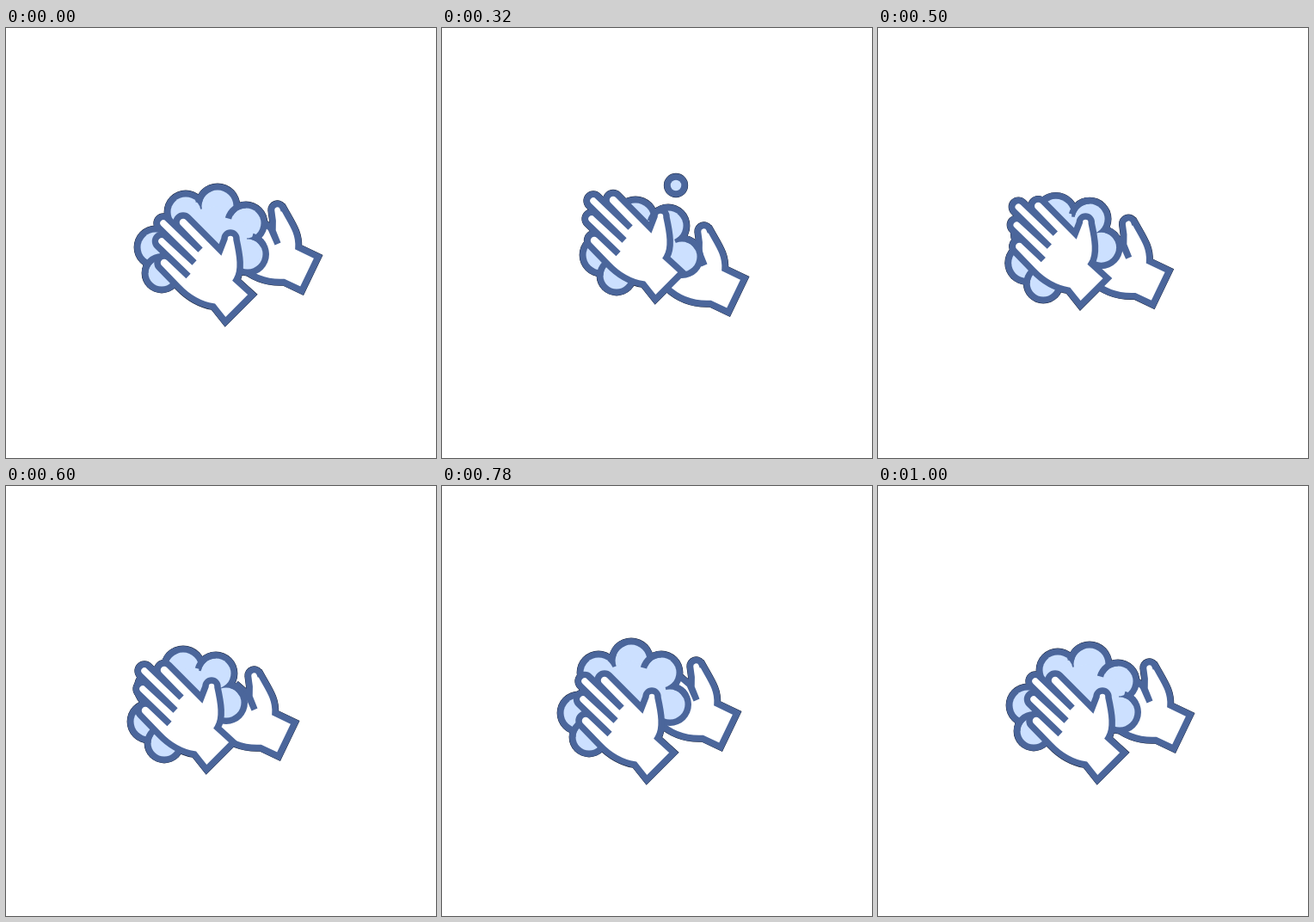
Animation, 500 px wide and 500 px high, one loop 1020 ms. Source, as an HTML page with a canvas:

```html
<!DOCTYPE html>
<html lang="en">
<head>
<meta charset="utf-8">
<title>Washing hands</title>
<style>
  html, body { margin: 0; width: 100%; height: 100%; overflow: hidden; background: #fff; }
  canvas { display: block; width: 100vw; height: 100vh; }
</style>
</head>
<body>
<canvas></canvas>
<script>
const SIZE = 500, LOOP = 1020, CYCLE = 1000, STEP = 20;
const INK = '#4b669b', RIM = '#141f38', FOAM = '#cce0ff', SKIN = '#fff';
const LINE = 7.5, RAD = Math.PI / 180;

const canvas = document.querySelector('canvas');
const ctx = canvas.getContext('2d');
const scale = window.devicePixelRatio || 1;
canvas.width = canvas.height = SIZE * scale;

// Key poses of the rubbing motion, spread over one cycle
const times = [0, 160, 320, 400, 600, 780];
const frontMove = [[0, 0], [2, -19], [-7, -26], [-15, -25], [-22, -12], [-17, 0]];
const backMove = [[0, 0], [2, 18], [-11, 25], [-19, 23], [-27, 9], [-20, -2]];

// Foam lobes: outer radius, centre at each pose, optional inward arc in degrees
const lobes = [
  { r: 25, at: [[209, 214], [214, 235], [198, 238], [188, 240], [174, 235], [182, 217]] },
  { r: 26, at: [[246, 207], [243, 218], [225, 222], [212, 222], [206, 212], [220, 203]], arc: [-170, -110] },
  { r: 25, at: [[279, 227], [278, 234], [263, 230], [252, 227], [244, 218], [255, 217]], arc: [-165, -90] },
  { r: 25, at: [[281, 263], [287, 272], [279, 266], [267, 260], [256, 252], [265, 254]], arc: [-75, -30] },
  { r: 23, at: [[181, 285], [196, 281], [203, 288], [200, 293], [184, 299], [171, 292]], arc: [-180, -80] },
  { r: 25, at: [[174, 255], [185, 252], [185, 264], [180, 270], [166, 274], [159, 264]] }
];

// Bubbles: time, x, y, radius
const bubbles = [
  [[20, 178, 220, 6], [160, 152, 202, 11.5], [240, 141, 194, 10], [300, 137, 191, 0]],
  [[180, 250, 215, 5], [320, 272, 183, 10], [400, 277, 176, 10], [440, 279.5, 173, 8], [500, 282, 169, 0]]
];

// Smooth periodic curve through the key poses
function pose(keys, t) {
  const n = times.length;
  const time = i => times[(i + n) % n] + CYCLE * Math.floor(i / n);
  const key = i => keys[(i + n) % n];
  let i = n - 1;
  while (times[i] > t) i--;
  const h = time(i + 1) - time(i), u = (t - time(i)) / h;
  return [0, 1].map(k => {
    const slope = j => (key(j + 1)[k] - key(j - 1)[k]) / (time(j + 1) - time(j - 1));
    const a = key(i)[k], b = key(i + 1)[k];
    return a + (b - a) * u * u * (3 - 2 * u)
      + h * u * (1 - u) * ((1 - u) * slope(i) - u * slope(i + 1));
  });
}

function bubbleAt(keys, t) {
  const i = keys.findIndex(k => k[0] > t);
  if (i < 1) return null;
  const a = keys[i - 1], b = keys[i], u = (t - a[0]) / (b[0] - a[0]);
  return [1, 2, 3].map(k => a[k] + (b[k] - a[k]) * u);
}

function frontHand() {
  const p = new Path2D();
  const finger = (x, y, r) => p.arc(x, y, r, -45 * RAD, 135 * RAD, true);
  p.moveTo(268, 293);
  p.bezierCurveTo(275, 282, 272, 264, 268, 246);
  p.arc(261, 245, 7, 0, Math.PI, true);
  p.lineTo(249, 258);
  finger(206, 226, 8);
  p.lineTo(226, 258);
  finger(183, 227, 7.5);
  p.lineTo(219, 273);
  finger(181, 248, 7.5);
  p.lineTo(212, 288.5);
  finger(184, 273, 8);
  p.lineTo(200, 301);
  p.quadraticCurveTo(218, 320, 241, 324);
  p.lineTo(255, 341.6);
  p.lineTo(286.6, 310);
  p.closePath();
  return p;
}

function backHand() {
  const p = new Path2D();
  p.moveTo(272, 277);
  p.quadraticCurveTo(293, 297, 323, 295.5);
  p.lineTo(344, 305.5);
  p.lineTo(363, 266);
  p.lineTo(340, 255);
  p.bezierCurveTo(341, 238, 333, 228, 322.5, 209);
  p.arc(315.5, 211.5, 7, -20 * RAD, 175 * RAD, true);
  p.quadraticCurveTo(311, 224, 310, 236);
  p.lineTo(316, 251);
  p.lineTo(308, 233);
  p.lineTo(294, 221);
  return p;
}

const front = frontHand(), back = backHand();

function disc(x, y, r, color) {
  ctx.fillStyle = color;
  ctx.beginPath();
  ctx.arc(x, y, Math.max(r, 0), 0, 2 * Math.PI);
  ctx.fill();
}

function drawHand(path, [x, y], ink, grow) {
  ctx.save();
  ctx.translate(x, y);
  ctx.fillStyle = SKIN;
  ctx.strokeStyle = ink;
  ctx.lineWidth = LINE + 2 * grow;
  ctx.fill(path);
  ctx.stroke(path);
  ctx.restore();
}

function drawFoam(t, ink, grow) {
  const spots = lobes.map(l => pose(l.at, t));
  const body = new Path2D();
  spots.forEach(([x, y]) => body.lineTo(x, y));
  body.closePath();
  ctx.strokeStyle = ink;
  ctx.lineWidth = 2 * LINE;
  ctx.stroke(body);
  lobes.forEach((l, i) => disc(...spots[i], l.r + grow, ink));
  lobes.forEach((l, i) => disc(...spots[i], l.r - LINE, FOAM));
  ctx.fillStyle = FOAM;
  ctx.fill(body);
  ctx.lineWidth = LINE;
  lobes.forEach((l, i) => {
    if (!l.arc) return;
    ctx.beginPath();
    ctx.arc(...spots[i], l.r - LINE / 2, l.arc[0] * RAD, l.arc[1] * RAD);
    ctx.stroke();
  });
}

function drawScene(t, ink, grow) {
  for (const keys of bubbles) {
    const b = bubbleAt(keys, t);
    if (!b) continue;
    const [x, y, r] = b;
    disc(x, y, r + LINE / 2 + grow, ink);
    disc(x, y, r - LINE / 2, FOAM);
  }
  drawHand(back, pose(backMove, t), ink, grow);
  drawFoam(t, ink, grow);
  drawHand(front, pose(frontMove, t), ink, grow);
}

function frame() {
  const t = Math.floor(performance.now() % LOOP / STEP) * STEP % CYCLE;
  ctx.setTransform(scale, 0, 0, scale, 0, 0);
  ctx.fillStyle = '#fff';
  ctx.fillRect(0, 0, SIZE, SIZE);
  ctx.miterLimit = 4;
  drawScene(t, RIM, 0.4); // thin dark rim around the silhouette
  drawScene(t, INK, 0);
  requestAnimationFrame(frame);
}
frame();
</script>
</body>
</html>
```
